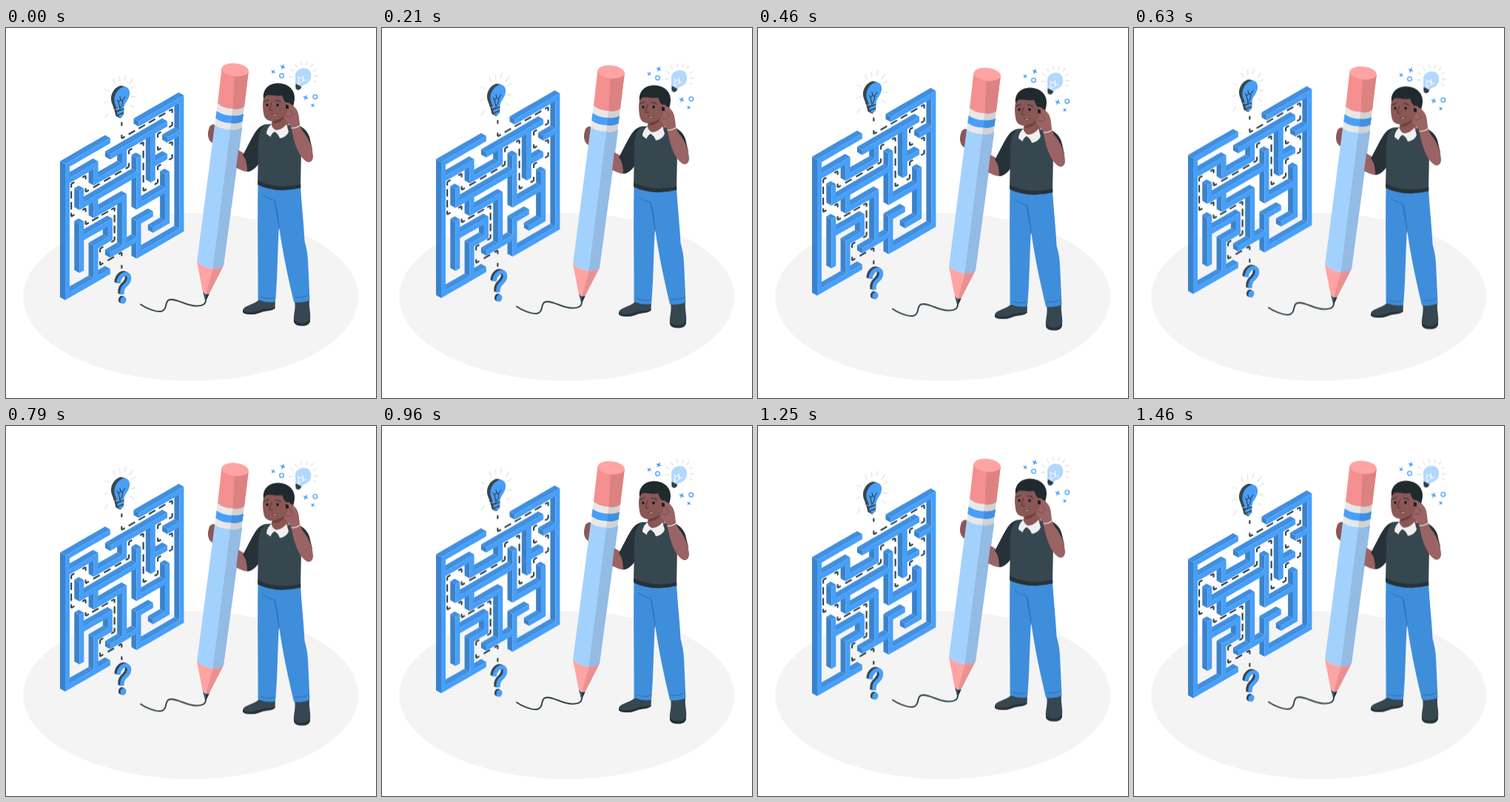
Write an HTML page that moves like this. It is 500 by 500 pixels and loops after 1.5 s.

```html
<!DOCTYPE html>
<html lang="en">
<head>
<meta charset="utf-8">
<title>Maze and pencil</title>
<style>
  html, body { margin: 0; width: 100%; height: 100%; overflow: hidden; background: #fff; }
  svg { display: block; width: 100vw; height: 100vh; }
  .maze { animation: rise 1.5s linear -.02s infinite; }
  .thinker { animation: sink 1.5s linear -1.02s infinite; }
  @keyframes rise {
    0%, 100% { transform: translateY(.27px); }
    50% { transform: translateY(-9.73px); }
  }
  @keyframes sink {
    0%, 100% { transform: translateY(6.4px); }
    50% { transform: translateY(-3.6px); }
  }
  .blue { fill: #479ff8; }
  .top { fill: #408fe0; }
  .side { fill: #3a82cb; }
  .dark { fill: #37474f; }
  .black { fill: #263238; }
  .skin { fill: #8a5755; }
  .arm { fill: #9a6364; }
  .line { fill: none; stroke: #37474f; stroke-linecap: round; stroke-linejoin: round; }
  .rays { fill: none; stroke: #e2e2e2; stroke-width: 1.3; stroke-linecap: round; }
  .spark { fill: none; stroke: #479ff8; stroke-width: 1.3; }
</style>
</head>
<body>
<svg viewBox="0 0 500 500">
  <defs>
    <path id="glass" d="M150 111C149.500 105 146 103 146.500 95C147.500 87 153 81 159 79.500C165 79 168 84 167 90C165.500 98 160 101 159.500 108Z"/>
    <path id="hook" d="M152 345C152.500 337 158 331.500 163 332.500C168.500 334.500 167 342.500 162.500 346.500C158.500 350 156.500 353 157 360" fill="none" stroke-width="5.400"/>
    <ellipse id="dot" cx="158.500" cy="367.800" rx="3.900" ry="4.900" transform="rotate(18 158.500 367.800)"/>
    <path id="star" d="M0-3.800L.9-.9L3.800 0L.9.9L0 3.800L-.9.9L-3.800 0L-.9-.9Z" fill="#479ff8"/>
  </defs>

  <ellipse cx="249.700" cy="363.500" rx="226.500" ry="113.500" fill="#f4f4f4"/>

  <g class="maze">
    <g id="trail" fill="none" stroke="#37474f" stroke-width="2.200"></g>
    <path id="lefts" class="side"/>
    <path id="tops" class="top"/>
    <path id="fronts" class="blue"/>

    <path class="rays" d="M162 64L160.500 70M153.500 66L154 72M145 69L147.500 75M171.500 69L167 75M175 78L169.500 81M174.500 93L169.500 93M134 83L139 85M133 101L138 99M134 121L138 115M172 107L168 104"/>
    <g class="dark">
      <use href="#glass" x="-4.500" y="-1.500"/>
      <use href="#glass" x="-2.200" y="-.7"/>
      <path d="M146 109L150 111L159.500 108L159 117L154.500 122L148.500 119Z"/>
    </g>
    <use href="#glass" class="blue"/>
    <path d="M150.500 113.500L159.300 110V113.500L150.500 117ZM151.500 118.500L158.500 115.500V118L154.500 121Z" class="blue"/>
    <path class="line" stroke-width="1.200" d="M154 109L152 100L150 97M154 109L157 104L158 97L161 93M152 100L155 97L158 99M155 97L154 93"/>

    <g class="dark" stroke="#37474f">
      <use href="#hook" x="-3" y="-1.300"/><use href="#hook" x="-1.500" y="-.7"/>
    </g>
    <g class="dark">
      <use href="#dot" x="-2.600" y="-1.100"/><use href="#dot" x="-1.300" y="-.6"/>
    </g>
    <use href="#hook" stroke="#479ff8"/>
    <use href="#dot" class="blue"/>
  </g>

  <g class="thinker">
    <path class="line" stroke-width="2" d="M182 373.500C188 378 201 383.500 209 383C219 381 214 370 220 367.500C229 364 243 375.500 256 375.500C265 375.500 270 374 270 367"/>

    <!-- legs and shoes -->
    <path class="dark" d="M343 365L364 367L363.500 378C358 383 351 381 344 384C336 388 323 388 320 384C319 377 326 376 332 373C337 371 341 369 343 365Z"/>
    <path class="black" d="M320 381C327 387 338 383 346 380C353 378 359 380 363.500 377V379C358 383 351 381.500 344 384.500C336 388 323 388 320 384Z"/>
    <path class="dark" d="M390 368H410C409 377 412 385 411 394C411 400 406 402 401 402C395 402 389 401 389 396C388 387 392 381 390 368Z"/>
    <path class="black" d="M389 394C394 401 406 400 411 393C411.500 400 407 402.500 401 402.500C394 402.500 388.500 401 389 394Z"/>
    <path fill="#3f8edb" d="M340.500 210L398 213C399.500 240 402.500 265 403.500 288C406 297 408 305 408.300 320L410.500 368Q400 372 389 370.500C382 340 374 305 369 268C367 296 367 340 364 370Q352 372 340.500 367C341 330 339.500 260 340.500 210Z"/>
    <path fill="none" stroke="#2f73b5" stroke-width="1.200" d="M347 225C351 230 357 231 363 233L369 268M363 233C367 245 368 258 369 272M344 363Q355 367 364 364M390 364Q400 365 409 361"/>

    <!-- fingers behind the pencil -->
    <path fill="#8b5756" d="M284 131C279 129 275 131 274 137C272 143 273 149 276 153L282 158Z"/>

    <!-- pencil -->
    <g>
      <path fill="#a3d1fd" d="M282 131L319 136L294 321Q288 327 280 325Q269 325 258 316Z"/>
      <path fill="#93bbe4" d="M303.500 136L319 134L294 321Q288 327 279.500 325Z"/>
      <path fill="#ffa3a3" d="M258 316Q269 325 280 325Q288 327 294 321L274 360L266 357Z"/>
      <path fill="#e89191" d="M280 325Q288 327 294 321L274 360L270 360Z"/>
      <path fill="#455a64" d="M266 356.500Q270 361 274.500 359.500L269.500 370Z"/>
      <path class="black" d="M270.500 360L274.500 359.500L269.500 370Z"/>
      <path fill="#e8e8e8" d="M286 101L322 105L318.500 134Q312 139 303 137Q290 137 282 131Z"/>
      <path fill="#d2d2d2" d="M306.500 105L322 105L318.500 134Q312 139 303 137Z"/>
      <path fill="#479ff8" d="M284.600 112Q293 118 305.500 118.500Q315 119.500 320.800 116L319.500 126Q313 130 304.500 128.500Q291 128 283.300 122Z"/>
      <path fill="#408fe0" d="M305.500 118.500Q315 119.500 320.800 116L319.500 126Q313 130 304.500 128.500Z"/>
      <path fill="#f49090" d="M291.500 54L327.800 58.500L322 106Q315 111 306.500 109Q294 109 286 102Z"/>
      <path fill="#dc8282" d="M309 60L327.800 58.500L322 106Q315 111 306.500 109Z"/>
      <ellipse cx="309.700" cy="56.500" rx="18.200" ry="8.800" transform="rotate(6 309.700 56.500)" fill="#ffa3a3"/>
    </g>

    <!-- pencil arm -->
    <path class="arm" d="M314 165C320 168 326 172 329 177L330 193C325 196 318 192 311 189Z"/>
    <path class="black" d="M352 130C342 131 337 140 332 149L320 172C325 177 326 187 326 194C333 194 339 188 345 178Z"/>

    <!-- torso -->
    <path class="black" d="M384 129C396 129 406 136 410 147L414 164L400 172L388 150Z"/>
    <path class="dark" d="M352 130C344 134 340 146 341 163L340 210Q362 221 398 214L399 165L393 136L379 129Z"/>
    <path class="black" d="M340.300 206Q368 219 398.300 211V216Q366 224 340.300 212Z"/>

    <!-- head -->
    <path class="skin" d="M360 120L379 112L382 133L367 143L358 136Z"/>
    <path fill="#6b403e" d="M361 124Q372 123 377 116Q375 128 361 129Z"/>
    <path fill="#f0f0f0" d="M358.500 130C354 134 352 139 352 143L357.500 147Q359 142 363 140Q368 143 370 149C376 148 380 145 382 140L379 130Q374 137 365 138Q360 136 358.500 130Z"/>
    <path class="skin" d="M349 91C346 99 347 113 349 119C351 125 358 127 364 125C373 123 380 116 384 109L387 91L367 83Z"/>
    <path fill="#20292e" d="M348 95C346.500 83 355 74.500 368 74.500C382 75 390.500 84 390 95C389.500 102 388 107 384 113L380 110L381 101C376 101 375 95 373 91C366 93 356 89 352 91Z"/>
    <ellipse cx="381" cy="106" rx="4" ry="5.500" class="skin"/>
    <g class="line" stroke="#261a1c" stroke-width="1.600">
      <path d="M349 99.500L354.500 97M364.500 98Q368 97 371 100"/>
      <path stroke="#5a3532" stroke-width="1.100" d="M359 101Q357 106 356 110Q357 112 360 111"/>
      <path fill="#f0e4e2" stroke="#5a3532" stroke-width=".8" d="M359.500 116.500Q363 117 367 116.500Q364 120.500 359.500 116.500Z"/>
    </g>
    <ellipse cx="353" cy="104" rx="1.600" ry="2" fill="#1a1718"/>
    <ellipse cx="367" cy="104" rx="1.700" ry="2" fill="#1a1718"/>

    <!-- raised arm -->
    <path class="arm" d="M376 102C380 101 387 102 391 108C396 113 396 122 397 130L400 138C407 146 414 158 415 173C415 179 412 182 407 181C398 176 393 164 389 151L385 133C381 127 376 125 376 119C379 117 381 114 381 108Z"/>
    <path fill="#1d2023" d="M378 103L382 104.500V109L378 109Z"/>
    <path fill="none" stroke="#774846" stroke-width="1" d="M382 109Q387 112 388 118M379 119Q383 121 386 119"/>
    <path fill="none" stroke="#e9dfdf" stroke-width="1.100" d="M385.500 135Q392 136 398 131"/>

    <!-- idea -->
    <path class="rays" d="M399 45.500L399.500 49.500M407 46L406 50M415 48.500L412 52M419.500 56L415.500 58M421 65L416.500 65M419.500 73L416 71.500M390.500 49L393 53M384 55.500L388 58M383 66H387"/>
    <path fill="#b4d8fd" d="M391 75C392 70 390 67 391.500 61C394 54.500 402 52.500 408 55.500C413 59 414 68 409 73C405 77 401 76 399 80Z"/>
    <path fill="none" stroke="#fff" stroke-width="1" d="M395 76L396 68L394 65M396 76L402 71L406 70M396 68L400 67L402 71L401 64"/>
    <path class="dark" d="M391.500 75L399.500 79.500L397 83Q394 85 391.500 82Z"/>
    <path d="M391.300 78L398 82" stroke="#263238" stroke-width="1.200"/>
    <use href="#star" transform="translate(361 59) rotate(35)"/>
    <use href="#star" transform="translate(374 52.500) rotate(25) scale(1.150)"/>
    <use href="#star" transform="translate(405 94) rotate(25) scale(1.150)"/>
    <use href="#star" transform="translate(414.500 104.500) rotate(35) scale(.9)"/>
    <circle class="spark" cx="372.500" cy="64.500" r="2.800"/>
    <circle class="spark" cx="417.800" cy="93" r="2.800"/>
  </g>
</svg>
<script>
  const SLOPE = .58, byId = id => document.getElementById(id);

  // Walls on an 8 x 8 grid: chains of col,row corners.
  const walls = `3,0 0,0 0,8 3,8|5,0 8,0 8,8 5,8 5,6 6,6|0,1 2,1 2,2 4,2 4,1|3,1 7,1
    |6,1 6,4|6,3 7,3|7,2 8,2|7,4 7,7 6,7|5,2 5,5 7,5|1,2 1,3 5,3
    |2,3 2,4 4,4 4,7|3,7 5,7|1,4 1,7|1,5 3,5 3,6 2,6 2,8`;
  const parse = text => text.trim().split(' ').map(p => p.split(',').map(Number));

  // Even indices are wall lines, odd ones the gaps between them.
  const solid = new Set(), key = (c, r) => c + ':' + r;
  for (const chain of walls.split('|')) {
    const pts = parse(chain);
    for (let k = 1; k < pts.length; k++) {
      const [a, b] = pts[k - 1], [c, d] = pts[k];
      for (let x = 2 * Math.min(a, c); x <= 2 * Math.max(a, c); x++)
        for (let y = 2 * Math.min(b, d); y <= 2 * Math.max(b, d); y++) solid.add(key(x, y));
    }
  }

  const edge = (n, pitch, thick) => (n >> 1) * pitch + (n & 1) * thick;
  const point = (u, v) => [80 + u, 184 - SLOPE * u + v];
  const back = ([x, y]) => [x - 7, y - 4];
  const poly = pts => 'M' + pts.map(p => p.map(n => n.toFixed(2)).join(' ')).join('L') + 'Z';

  let lefts = '', tops = '', fronts = '';
  for (const cell of solid) {
    const [c, r] = cell.split(':').map(Number);
    const [left, right, up, down] = [[-1, 0], [1, 0], [0, -1], [0, 1]]
      .map(([x, y]) => solid.has(key(c + x, r + y)));
    let [u0, u1] = [c, c + 1].map(n => edge(n, 19.3, 6));
    let [v0, v1] = [r, r + 1].map(n => edge(n, 22.1, 7));
    // Free ends stop in the middle of their node.
    if (left + right + up + down === 1) {
      if (right) u0 += 3;
      if (left) u1 -= 3;
      if (down) v0 += 3.5;
      if (up) v1 -= 3.5;
    }
    const tl = point(u0, v0), tr = point(u1, v0), bl = point(u0, v1), br = point(u1, v1);
    fronts += poly([tl, tr, br, bl]);
    if (!left) lefts += poly([back(tl), tl, bl, back(bl)]);
    if (!up) tops += poly([back(tl), back(tr), tr, tl]);
  }
  byId('lefts').setAttribute('d', lefts);
  byId('tops').setAttribute('d', tops);
  byId('fronts').setAttribute('d', fronts);

  // Solution: dashes fitted to each leg so that every corner is inked.
  const route = parse('3.5,-1 3.5,0 7,0 7,1 6,1 6,2 7,2 7,3 6,3 6,4 5,4 5,1 4,1 4,2 1,2 1,1 0,1 0,3 1,3 1,4 3,4 3,6 2,6 2,7 3.5,7 3.5,8')
    .map(([c, r]) => [88.1 + 19.5 * c, 188.8 + 22 * r - SLOPE * 19.5 * c]);
  let legs = '';
  for (let k = 1; k < route.length; k++) {
    const [[a, b], [c, d]] = [route[k - 1], route[k]];
    const len = Math.hypot(c - a, d - b), step = len / Math.max(1, Math.floor(len / 14));
    legs += `<path d="M${a} ${b}L${c} ${d}" stroke-dasharray="10 ${step - 10}" stroke-dashoffset="5"/>`;
  }
  byId('trail').innerHTML = legs;
</script>
</body>
</html>
```
